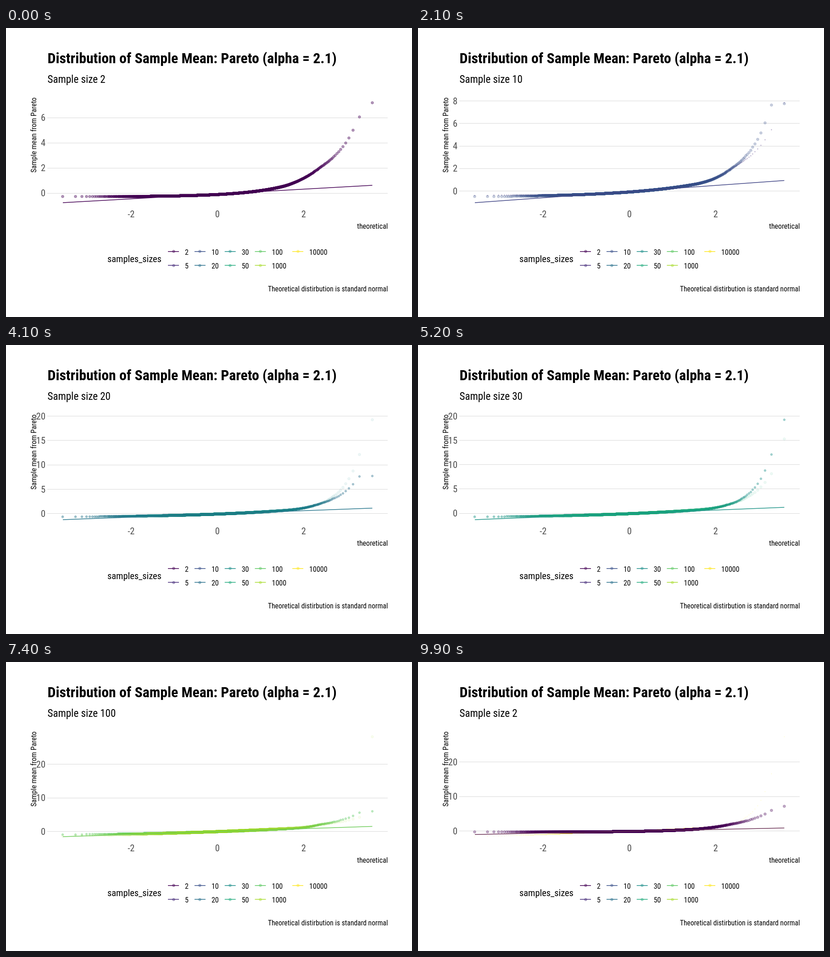
An HTML page with a canvas that plays this animation: 885 by 632 pixels, repeating every 10000 ms.

```html
<!DOCTYPE html>
<html lang="en">
<head>
<meta charset="utf-8">
<title>Distribution of Sample Mean</title>
<style>
html, body { margin: 0; width: 885px; height: 632px; overflow: hidden; background: #fff; }
canvas { display: block; }
</style>
</head>
<body>
<canvas id="stage" width="885" height="632"></canvas>
<script>
const c = document.getElementById('stage').getContext('2d');
const LEFT = 90, RIGHT = 832, MID = 461.2, UNIT = 94;   // horizontal scale
const TOP = 163, BOTTOM = 382;                          // where the data extremes land
const COUNT = 3000, ALPHA = 0.4, RADIUS = 2.8, LINE = 1.5;
const GREY = '#4d4d4d', AXIS = 20.4, SMALL = 16;

const lerp = (a, b, p) => a + (b - a) * p;
const clamp = v => Math.min(1, Math.max(0, v));
const smooth = v => (v = clamp(v), v * v * (3 - 2 * v));
const toX = z => MID + UNIT * z;

function normalScore(p) {
  if (p > 0.5) return -normalScore(1 - p);
  const t = Math.sqrt(-2 * Math.log(p));
  return (2.515517 + t * (.802853 + t * .010328)) /
    (1 + t * (1.432788 + t * (.189269 + t * .001308))) - t;
}

const scores = Array.from({ length: COUNT }, (_, i) => normalScore((i + 0.5) / COUNT));

// Skewed body that nears a straight line as samples grow, with a power-law upper tail.
// The two largest means, next and top, are given.
function makeState(size, color, next, top) {
  const L = Math.log10(size);
  const bend = 0.1 + 1.2 * Math.exp(-0.9 * L);
  const slope = 0.13 + 0.165 * L - 0.014 * L * L;
  const body = z => -0.12 + 0.027 * L + slope * Math.expm1(bend * z) / bend;

  const tailStart = 0.0082, tailValue = 2.1;
  const power = Math.log(next / tailValue) / Math.log(tailStart * COUNT / 1.5);
  const tail = q => tailValue * (tailStart / q) ** (q < tailStart ? power : 0.48);

  const values = scores.map((z, i) =>
    lerp(body(z), tail(1 - (i + 0.5) / COUNT), smooth((z - 1.5) / 0.9)));
  values[COUNT - 1] = top;

  // Reference line through the quartiles
  const quartile = 0.6745, low = body(-quartile), high = body(quartile);
  const line = [scores[0], scores[COUNT - 1]]
    .map(z => (low + high) / 2 + z * (high - low) / (2 * quartile));
  return { size, color, values, line };
}

const states = [
  makeState(2, '#440154', 6.06, 7.2),
  makeState(5, '#472d7b', 5.44, 7.87),
  makeState(10, '#3b528b', 7.65, 7.76),
  makeState(20, '#2c728e', 7.65, 7.7),
  makeState(30, '#21908c', 12.1, 19.3),
  makeState(50, '#27ad81', 8.1, 15.3),
  makeState(100, '#5dc863', 5.6, 6.05),
  makeState(1000, '#aadc32', 4.2, 28.3),
  makeState(10000, '#fde725', 16.6, 27.4)
];

function text(str, x, y, size, { align = 'left', color = '#000', weight = 400 } = {}) {
  c.font = `${weight} condensed ${size}px "Roboto Condensed", Roboto, sans-serif`;
  c.fontStretch = 'condensed';
  c.textAlign = align;
  c.fillStyle = color;
  c.fillText(str, x, y);
}

function dot(x, y, scale = 1) {
  c.lineWidth = scale;
  c.beginPath();
  c.arc(Math.floor(x) + 0.5, Math.floor(y) + 0.5, RADIUS * scale, 0, 7);
  c.fill();
  c.stroke();
}

function segment(x1, y1, x2, y2) {
  c.lineWidth = LINE;
  c.beginPath();
  c.moveTo(x1, y1);
  c.lineTo(x2, y2);
  c.stroke();
}

function drawPoints(state, y, scale, fade) {
  c.globalAlpha = ALPHA * fade;
  c.fillStyle = c.strokeStyle = state.color;
  scores.forEach((z, i) => dot(toX(z), y(state.values[i]), scale));
  c.globalAlpha = 1;
}

function drawLegend() {
  let x = 365;
  text('samples_sizes', 221, 512, AXIS);
  states.forEach((s, i) => {
    const y = i % 2 ? 519 : 488.8;
    c.fillStyle = c.strokeStyle = s.color;
    segment(x - 12, y, x + 12, y);
    c.globalAlpha = ALPHA;
    dot(x, y);
    c.globalAlpha = 1;
    text(s.size, x + 25, y + 7.2, SMALL);
    if (i % 2) x += 50 + c.measureText(s.size).width;
  });
}

function drawLabels(size) {
  text('Distribution of Sample Mean: Pareto (alpha = 2.1)', 90.5, 77, 31.75, { weight: 700 });
  text('Sample size ' + size, 90.5, 120, 23);
  for (const v of [-2, 0, 2])
    text(v, toX(v) - 0.5, 414, AXIS, { align: 'center', color: GREY });
  text('theoretical', 832.5, 439, SMALL, { align: 'right' });
  text('Theoretical distirbution is standard normal', 832.5, 575.5, 15.6, { align: 'right' });
  c.save();
  c.translate(66, 152);
  c.rotate(-Math.PI / 2);
  text('Sample mean from Pareto', 0, 0, SMALL, { align: 'right' });
  c.restore();
}

function drawGrid(y, low, high) {
  const range = high - low, step = range < 10.5 ? 2 : range < 24 ? 5 : 10;
  for (let v = 0; v <= high + range * 0.05; v += step) {
    c.fillStyle = '#d9d9d9';
    c.fillRect(LEFT, Math.floor(y(v)), RIGHT - LEFT, 1);
    text(v, 86, y(v) + 7.2, AXIS, { align: 'right', color: GREY });
  }
}

// Which state is shown at a tick (100 ms), and how far it has moved to the next one
function poseAt(tick) {
  const start = i => Math.min(6 + 12 * i, 8 + 11 * i);
  let i = 0;
  while (i < states.length - 1 && tick >= start(i + 1)) i++;
  const p = clamp((tick - start(i) + 1) / (i < 2 ? 6 : 5));
  const from = states[i], to = states[(i + 1) % states.length];
  return p < 1 ? { from, to, p } : { from: to, to, p: 0 };
}

function draw(tick) {
  const { from, to, p } = poseAt(tick);
  const shown = p ? [from, to] : [from];
  const [start, end] = from.line.map((v, i) => lerp(v, to.line[i], p));
  const low = Math.min(start, ...shown.map(s => s.values[0]));
  const high = Math.max(end, ...shown.map(s => s.values[COUNT - 1]));
  const y = v => lerp(BOTTOM, TOP, (v - low) / (high - low));

  c.fillStyle = '#fff';
  c.fillRect(0, 0, 885, 632);
  drawGrid(y, low, high);
  drawPoints(from, y, 1 - p, 1);
  if (p) drawPoints(to, y, 1, p);

  c.strokeStyle = `color-mix(in lab, ${from.color}, ${to.color} ${p * 100}%)`;
  segment(toX(scores[0]), y(start), toX(scores[COUNT - 1]), y(end));

  drawLabels((p < 0.5 ? from : to).size);
  drawLegend();
}

const began = performance.now();
let shownTick = -1;
function loop() {
  const tick = Math.floor((performance.now() - began) / 100) % 100;
  if (tick !== shownTick) draw(shownTick = tick);
  requestAnimationFrame(loop);
}
loop();
</script>
</body>
</html>
```
